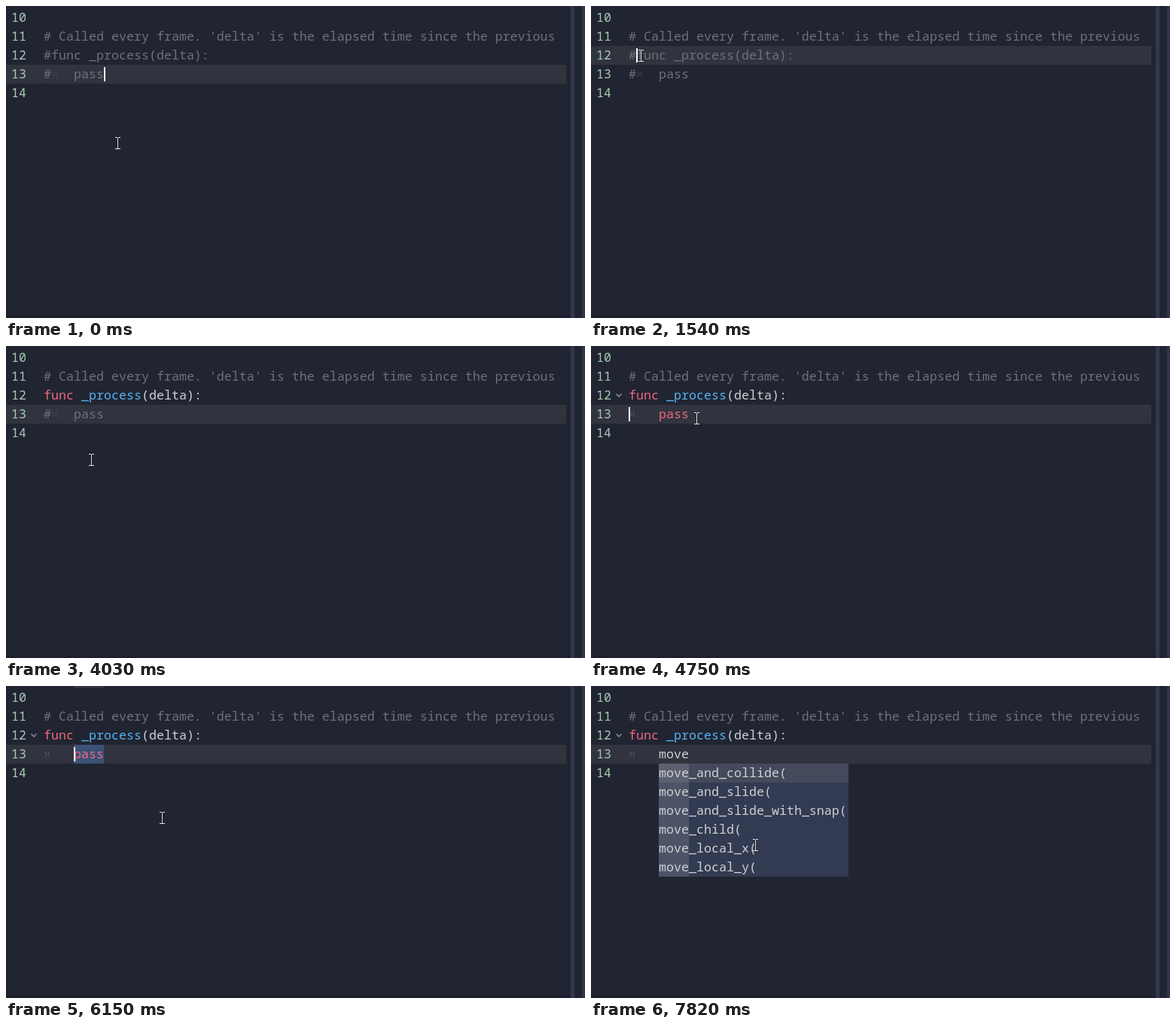
Recreate the animation shown at these times as an HTML page with a canvas. Size 769 by 414 pixels, loop 8 s.

```html
<!DOCTYPE html>
<html lang="en">
<head>
<meta charset="utf-8">
<title>Code editor</title>
<style>
  html, body { margin: 0; width: 100%; height: 100%; overflow: hidden; background: #202531; }
  canvas { display: block; }
</style>
</head>
<body>
<canvas id="stage" width="769" height="414"></canvas>
<script>
const ctx = document.getElementById('stage').getContext('2d');
const LOOP = 8000, BLINK = 510;
const CELL = 10, ROW = 25, LEFT = 50, INDENT = 90;

const color = {
  bg: '#202531', line: '#31343f', number: '#a6cbb0', comment: '#6d717a',
  keyword: '#f2667f', func: '#57b3f5', text: '#cdcfd3', symbol: '#c6d0e2',
  selection: '#3a5275', strip: '#31384c', tab: '#4b5166', tabDim: '#3c414c',
  popup: '#323b51', popupRow: '#444a5c', click: 'rgba(214,184,16,.84)'
};

const commentLine = "# Called every frame. 'delta' is the elapsed time since the previous";
const completions = ['move_and_collide(', 'move_and_slide(', 'move_and_slide_with_snap(',
  'move_child(', 'move_local_x(', 'move_local_y('];

// Pointer path: time, x, y
const path = [
  [20, 148, 182], [180, 139, 169], [450, 107, 119], [660, 85, 83], [810, 78, 73], [1200, 66, 66],
  [2600, 66, 66], [2810, 66, 83], [3060, 66, 89],
  [3540, 66, 89], [3680, 75, 101], [3900, 104, 140], [4030, 113, 151],
  [4080, 113, 151], [4330, 155, 128], [4560, 161, 106], [4820, 133, 93],
  [4950, 131, 93], [5220, 105, 92], [5500, 91, 93],
  [5730, 91, 93], [5900, 135, 117], [6150, 207, 175], [6250, 218, 211]
];
const clicks = [[1350, 1540], [3300, 3500], [4950, 5730]];
const blinkStarts = [0, 1350, 2070, 3300, 4340, 4950, 5150, 5660, 6880, 7040, 7120, 7310];
const keys = [6880, 7040, 7120, 7330];

const rowTop = n => 3 + (n - 10) * ROW;

function rect(x, y, w, h, fill) {
  ctx.fillStyle = fill;
  ctx.fillRect(x, y, w, h);
}

function text(str, x, line, fill) {
  ctx.fillStyle = fill;
  ctx.fillText(str, x, rowTop(line) + 18);
}

function stroke(points, style, width) {
  ctx.strokeStyle = style;
  ctx.lineWidth = width;
  ctx.beginPath();
  points.forEach(([x, y]) => ctx.lineTo(x, y));
  ctx.stroke();
}

function pointerAt(t) {
  const i = path.findIndex(p => p[0] > t);
  if (i === 0) return path[0].slice(1);
  if (i < 0) return path[path.length - 1].slice(1);
  const [t0, x0, y0] = path[i - 1], [t1, x1, y1] = path[i];
  const k = (t - t0) / (t1 - t0);
  return [Math.round(x0 + (x1 - x0) * k), Math.round(y0 + (y1 - y0) * k)];
}

function caretAt(t, mouseX, typed) {
  if (t < 1350) return [13, 130];
  if (t < 2070) return [12, 60];
  if (t < 3300) return [12, 50];
  if (t < 4340) return [13, 60];
  if (t < 4950) return [13, 50];
  if (t >= 6880) return [13, INDENT + typed * CELL];
  const col = t < 5500 ? Math.ceil((mouseX - 91) / CELL) : 0;
  return [13, INDENT + Math.max(0, Math.min(4, col)) * CELL];
}

function drawTab(x, fill) {
  stroke([[x + 1, 87], [x + 4.5, 90.5], [x + 1, 94]], fill, 1.4);
  rect(x + 6, 87, 1.4, 7, fill);
}

function drawCode(t, typed) {
  for (let n = 10; n <= 14; n++) text(String(n), 7, n, color.number);
  text(commentLine, LEFT, 11, color.comment);

  if (t < 2070) {
    text('#func _process(delta):', LEFT, 12, color.comment);
  } else {
    text('func', LEFT, 12, color.keyword);
    text('_process', 100, 12, color.func);
    text('(', 180, 12, color.symbol);
    text('delta', 190, 12, color.text);
    text('):', 240, 12, color.symbol);
  }

  const active = t >= 4340;
  drawTab(active ? LEFT : LEFT + CELL, active ? color.tab : color.tabDim);
  if (active) stroke([[33.5, 63.5], [37, 67], [40.5, 63.5]], '#858994', 1.6);
  else text('#', LEFT, 13, color.comment);

  if (typed) text('move'.slice(0, typed), INDENT, 13, color.text);
  else text('pass', INDENT, 13, active ? color.keyword : color.comment);
}

function drawPopup() {
  const top = rowTop(14);
  rect(INDENT, top, 252, ROW * completions.length, color.popup);
  rect(INDENT, top, 252, ROW, color.popupRow);
  rect(INDENT, top, 4 * CELL, ROW * completions.length, 'rgba(255,255,255,.13)');
  completions.forEach((name, i) => text(name, INDENT, 14 + i, color.text));
}

function drawPointer(x, y) {
  rect(x - 1, y - 7, 3, 15, 'rgba(0,0,0,.3)');
  rect(x, y - 7, 1, 15, '#e6e6e6');
  for (const edge of [y - 8, y + 7]) {
    rect(x - 3, edge, 3, 1, '#e6e6e6');
    rect(x + 1, edge, 3, 1, '#e6e6e6');
  }
}

function draw(t) {
  const [mx, my] = pointerAt(t);
  const typed = keys.filter(k => t >= k).length;
  const [line, caretX] = caretAt(t, mx, typed);
  const selecting = t >= 4950 && t < 6880;

  rect(0, 0, 769, 414, color.bg);
  rect(0, rowTop(line), 744, ROW, color.line);
  rect(750, 0, 5, 414, color.strip);
  rect(765, 0, 4, 414, color.strip);
  rect(0, 411, 750, 3, '#1c202b');

  if (selecting) {
    rect(caretX, rowTop(13), 130 - caretX, ROW, color.selection);
    if (caretX === INDENT) rect(INDENT, 0, 40, 3, color.line);
  }
  drawCode(t, typed);

  const start = blinkStarts.filter(s => s <= t).pop();
  if (Math.floor((t - start) / BLINK) % 2 === 0) rect(caretX, rowTop(line) + 3, 2, 19, '#fff');

  if (t >= 7630) drawPopup();

  if (clicks.some(([down, up]) => t >= down && t < up)) {
    ctx.fillStyle = color.click;
    ctx.beginPath();
    ctx.arc(mx - 1.5, my + 1.5, 12, 0, Math.PI * 2);
    ctx.fill();
  }
  drawPointer(mx, my);
}

ctx.font = '16.667px "Noto Sans Mono", "DejaVu Sans Mono", monospace';
ctx.textBaseline = 'alphabetic';

const begin = performance.now();
function tick() {
  draw((performance.now() - begin) % LOOP);
  requestAnimationFrame(tick);
}
tick();
</script>
</body>
</html>
```
